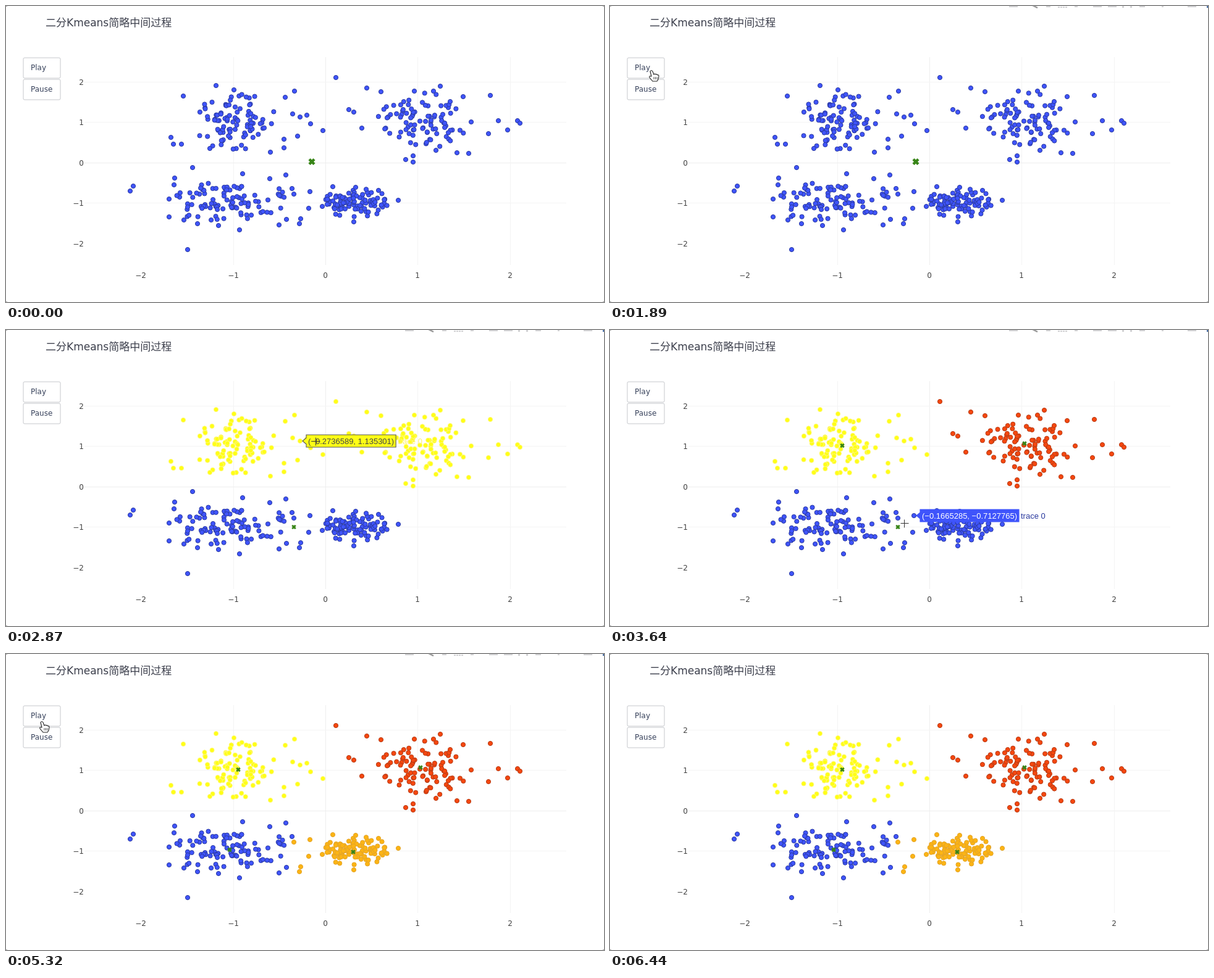
An HTML page with a canvas that plays this animation: 968 by 480 pixels, repeating every 6510 ms.

```html
<!DOCTYPE html>
<html lang="zh">
<head>
<meta charset="utf-8">
<style>
html, body { margin: 0; width: 968px; height: 480px; overflow: hidden; background: #fff; }
canvas { display: block; }
</style>
</head>
<body>
<canvas id="stage" width="968" height="480"></canvas>
<script>
const ctx = document.getElementById('stage').getContext('2d');
const LOOP = 6510, SPLIT = [2100, 3050, 4000];
const SANS = '"DejaVu Sans", "Noto Sans CJK SC", "Noto Sans CJK", sans-serif';
const HOVER = '13px "Liberation Sans", Arial, sans-serif';

const BLUE = ['#3f54fb', '#2b3a9e'], YELLOW = ['#ffff16', '#fff97c'];
const RED = ['#f5470f', '#b53c16'], ORANGE = ['#fcb414', '#e3a52c'];

// Each cluster: a clipped normal cloud plus its outlying points.
const clusters = [
  { cloud: [370, 185, 40, 26, 92], edge: [340,129, 287,146, 369,136, 467,138, 452,148, 267,213,
    271,224, 284,224, 330,231, 428,237, 450,230, 450,216, 472,211, 513,202, 493,191, 487,177,
    464,175, 476,180], style: t => t < SPLIT[0] ? BLUE : YELLOW },
  { cloud: [672, 185, 42, 25, 86], edge: [534,116, 584,133, 607,139, 703,130, 784,145, 692,138,
    661,138, 740,147, 719,155, 797,186, 828,186, 832,190, 812,201, 781,207, 753,188, 749,239,
    730,238, 696,234, 659,243, 659,253, 647,249, 555,168, 563,172, 576,198],
    style: t => t < SPLIT[0] ? BLUE : t < SPLIT[1] ? YELLOW : RED },
  { cloud: [363, 317, 52, 20, 92], edge: [201,300, 206,292, 302,262, 294,395, 264,342, 264,313,
    273,279, 272,290, 288,347, 310,353, 344,356, 378,363, 383,272, 427,280, 453,274, 463,296,
    442,355, 454,346], style: () => BLUE },
  { cloud: [567, 320, 30, 13, 95], edge: [492,301, 466,305, 490,328, 477,345, 475,353, 512,325,
    529,293, 566,294, 603,299, 563,350, 635,315], style: t => t < SPLIT[2] ? BLUE : ORANGE }
];

let seed = 20;
const rand = () => (seed = (seed * 16807) % 2147483647) / 2147483647;

for (const c of clusters) {
  const [x, y, sx, sy, n] = c.cloud;
  c.points = [];
  while (c.points.length < n) {
    const r = Math.sqrt(-2 * Math.log(rand())), a = rand() * 2 * Math.PI;
    if (r < 1.85) c.points.push([x + sx * r * Math.cos(a), y + sy * r * Math.sin(a)]);
  }
  for (let i = 0; i < c.edge.length; i += 2) c.points.push([c.edge[i], c.edge[i + 1]]);
}

// Centroids: x, y, visible from, visible until, arm length
const centroids = [
  [495, 252.5, 0, SPLIT[0], 4], [523, 185, SPLIT[0], SPLIT[1], 2.7],
  [466, 319.5, SPLIT[0], SPLIT[2], 2.7], [376, 187.5, SPLIT[1], LOOP, 2.7],
  [671, 184, SPLIT[1], LOOP, 2.7], [362, 317.5, SPLIT[2], LOOP, 2.7],
  [562, 321, SPLIT[2], LOOP, 2.7]
];

const labels = [
  { from: 2730, to: 3010, x: 476, y: 180, text: '(−0.2736589, 1.135301)',
    fill: '#ffff16', ink: '#444', line: '#555', side: '#fff36b' },
  { from: 3500, to: 3850, x: 492, y: 301, text: '(−0.1665285, −0.7127765)',
    fill: '#3f54fb', ink: '#fff', line: '#3f54fb', side: '#2b3a9e' },
  { from: 4000, to: 4620, x: 463, y: 305.5, text: '(−0.3424045, −0.7762705)',
    fill: '#000', ink: '#fff', line: '#000', side: '#000' }
];

// Pointer: time, x, y
const path = [[980, 420, 306], [1400, 86, 122], [1620, 67, 106], [2120, 67, 106], [2830, 501, 180],
  [3000, 501, 180], [3640, 477, 313], [4480, 471, 323], [4650, 471, 323], [5250, 58, 111],
  [5680, 58, 111], [6080, 110, 490]];

function line(x1, y1, x2, y2, color, width = 1) {
  ctx.strokeStyle = color;
  ctx.lineWidth = width;
  ctx.beginPath();
  ctx.moveTo(x1, y1);
  ctx.lineTo(x2, y2);
  ctx.stroke();
}

function text(str, x, y, color, font = '12px ' + SANS, align = 'left') {
  ctx.font = font;
  ctx.fillStyle = color;
  ctx.textAlign = align;
  ctx.fillText(str, x, y);
}

function shape(d, x, y, fill, stroke) {
  ctx.save();
  ctx.translate(x, y);
  const p = new Path2D(d);
  ctx.fillStyle = fill;
  ctx.fill(p);
  ctx.strokeStyle = stroke;
  ctx.lineWidth = 1.1;
  ctx.stroke(p);
  ctx.restore();
}

function drawFrame() {
  ctx.fillStyle = '#fff';
  ctx.fillRect(0, 0, 968, 480);
  ctx.fillStyle = '#aaa';
  for (const x of [0, 966]) for (const y of [0, 479]) ctx.fillRect(x, y, 2, 1);
  for (let v = -2; v <= 2; v++) {
    const x = Math.round(517 + v * 149.4), y = 254 - v * 65.5;
    const color = v ? '#f4f4f4' : '#eee', name = String(v).replace('-', '−');
    if (v > -2) {
      line(x + .5, 83, x + .5, 420, color);
      line(127, Math.floor(y) + .5, 907, Math.floor(y) + .5, color);
    }
    text(name, x, 441, '#444', undefined, 'center');
    text(name, 126, y + 4.5, '#444', undefined, 'right');
  }
  text('二分Kmeans简略中间过程', 64, 33, '#3c3f4c', '17px ' + SANS);
  ['Play', 'Pause'].forEach((name, i) => {
    ctx.strokeStyle = '#c6c8cc';
    ctx.lineWidth = 1;
    ctx.beginPath();
    ctx.roundRect(28, 84 + 35 * i, 60, 33, 2);
    ctx.stroke();
    text(name, 40, 104 + 35 * i, '#36405a');
  });
}

function drawPoints(t) {
  for (const c of clusters) {
    const [fill, stroke] = c.style(t);
    ctx.fillStyle = fill;
    ctx.strokeStyle = stroke;
    ctx.lineWidth = 1;
    for (const [x, y] of c.points) {
      ctx.beginPath();
      ctx.arc(x, y, 3.6, 0, 7);
      ctx.fill();
      ctx.stroke();
    }
  }
  for (const [x, y, from, to, r] of centroids) {
    if (t < from || t >= to) continue;
    line(x - r, y - r, x + r, y + r, '#388518', r * 1.1);
    line(x - r, y + r, x + r, y - r, '#388518', r * 1.1);
  }
}

function drawLabel({ x, y, text: str, fill, ink, line: edge, side }) {
  ctx.font = HOVER;
  const w = ctx.measureText(str).width + 6;
  shape(`M4 0L10 -5V-10H${10 + w}V10H10V5Z`, x, y, fill, edge);
  text(str, x + 13, y + 4.5, ink, HOVER);
  text('trace 0', x + w + 13, y + 4.5, side, HOVER);
}

function drawToolbar() {
  ctx.fillStyle = '#d2d2d4';
  for (const [x, w] of [[646, 14], [706, 7], [752, 5], [782, 14], [806, 14], [857, 9], [893, 3], [935, 14]])
    ctx.fillRect(x, 0, w, 2);
  for (let x = 725; x < 741; x += 4) ctx.fillRect(x, 1, 3, 2);
  for (const x of [829, 842]) ctx.fillRect(x, 0, 3, 3);
  line(684, -1, 692, 3, '#999', 2.5);
  ctx.fillStyle = '#4b70a8';
  ctx.fillRect(966, 0, 2, 3);
}

function drawPointer(t) {
  const i = path.findIndex(p => p[0] > t);
  if (i < 1) return;
  const [t0, x0, y0] = path[i - 1], [t1, x1, y1] = path[i];
  const u = (t - t0) / (t1 - t0), e = u * u * (3 - 2 * u);
  const x = x0 + (x1 - x0) * e, y = y0 + (y1 - y0) * e;
  if (x > 127 && x < 907 && y > 83 && y < 420) {
    const cx = Math.floor(x) + .5, cy = Math.floor(y) + .5;
    line(cx - 6, cy, cx + 7, cy, '#333');
    line(cx, cy - 6, cx, cy + 7, '#333');
  } else if (x > 28 && x < 88 && y > 84 && y < 152) {
    shape('M-2 0Q0 -3 2 0L4 5Q6 3 7 5Q9 4 10 6Q12 5 12 8L11 13L9 16H2L-3 10Q-4 7 -1 8L0 8Z',
      x, y, '#fff', '#222');
    for (const d of [4, 6.5, 9]) line(x + d, y + 9, x + d, y + 13, '#222', .8);
  } else {
    shape('M0 0V14L3 11L6 17L8 16L5.5 10H10Z', x, y, '#111', '#fff');
  }
}

const start = performance.now();
function render(now) {
  const t = Math.max(0, now - start) % LOOP;
  drawFrame();
  drawPoints(t);
  if (t >= 980 && t < 6080) drawToolbar();
  for (const l of labels) if (t >= l.from && t < l.to) drawLabel(l);
  drawPointer(t);
  requestAnimationFrame(render);
}
render(start);
</script>
</body>
</html>
```
